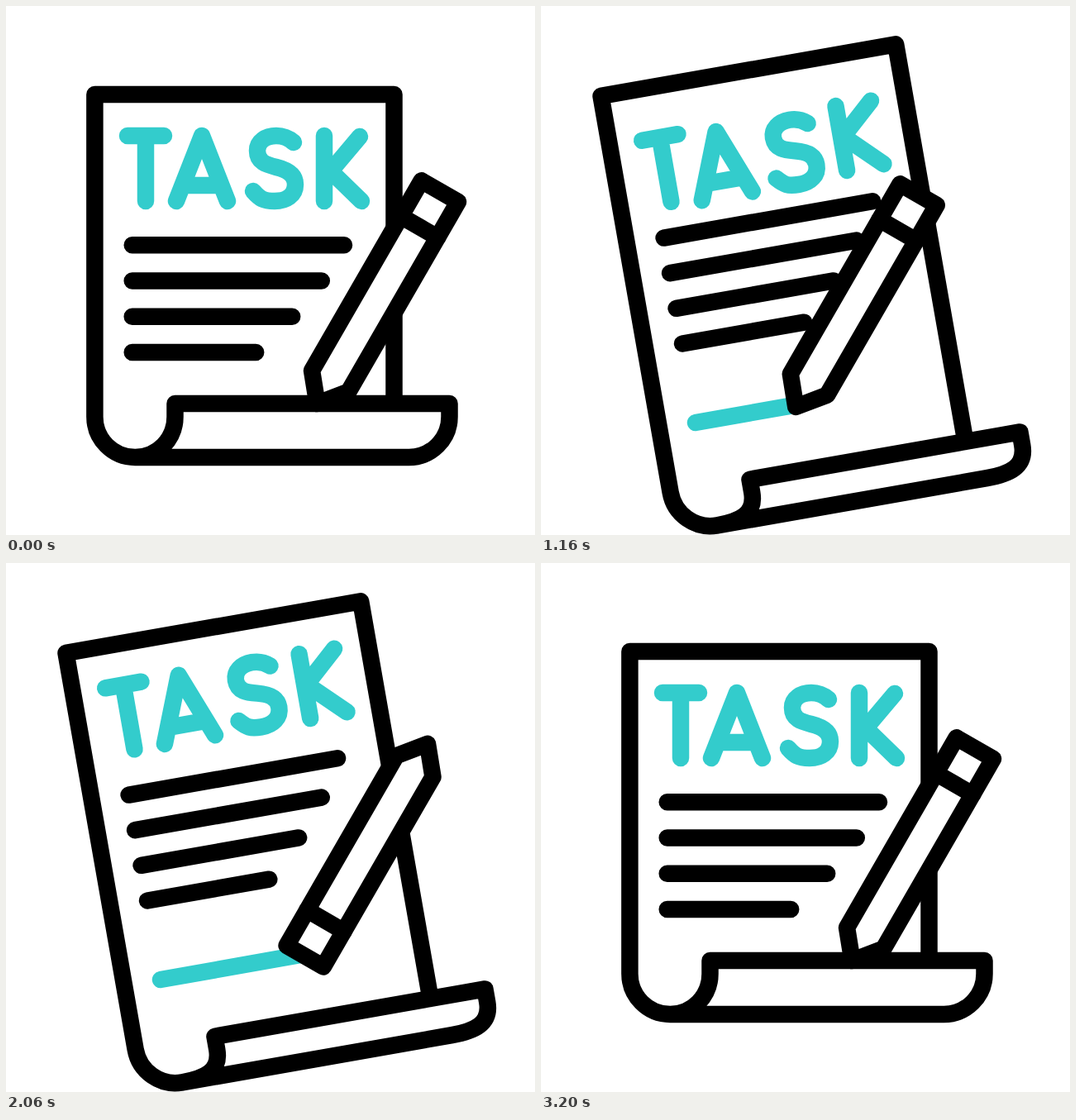
Recreate the animation shown at these times as an HTML page. Size 640 by 640 pixels, loop 3.42 s.

```html
<!DOCTYPE html>
<html lang="en">
<head>
<meta charset="utf-8">
<title>Task</title>
<style>
  html, body { margin: 0; width: 100%; height: 100%; overflow: hidden; background: #fff; }
  svg { display: block; width: 100vw; height: 100vh; }
  path { fill: none; stroke: #000; stroke-width: 20.5; stroke-linecap: round; stroke-linejoin: round; }
  .teal, .teal path { stroke: #3cc; }
</style>
</head>
<body>
<svg viewBox="0 0 640 640">
  <g id="paper">
    <path id="sheet"/>
    <path id="rules"/>
    <g class="teal" id="word" role="img" aria-label="TASK">
      <path d="M39 50h44m-22 0v79"/>
      <path d="M98 129l31-79 31 79m-54-19h46"/>
      <path d="M240 58Q231 50 219 50C206 50 196 57 196 68C196 82 207 85 219 88S242 96 242 109 231 129 217 129 199 126 191 117"/>
      <path id="k"/>
    </g>
  </g>
  <path id="line" class="teal"/>
  <g id="pencil">
    <path d="M-25.6-132.6H25.6V132.6L0 164L-25.6 132.6Z" style="fill:#fff"/>
    <path d="M-25.6-83H25.6"/>
  </g>
</svg>
<script>
const LOOP = 3420, STEP = 600;
const $ = id => document.getElementById(id);
const letters = [...$('word').children];
const place = (el, transform) => el.setAttribute('transform', transform);
const shape = (id, d) => $(id).setAttribute('d', d);

// Eased 0 to 1, beginning at the given time
function ease(t, begin, length = STEP) {
  const p = Math.min(1, Math.max(0, (t - begin) / length));
  return p * p * (3 - 2 * p);
}

// Up, down past the middle, then home
const wave = t => 18 * (2 * ease(t, 500, 460) - ease(t, 0, 500) - ease(t, 960, 500));

// Text rules, each shorter than the one above
let rules = '';
for (let i = 0; i < 4; i++) rules += `M44.7 ${182.2 + 43.3 * i}H${301 - 23 * i - 4.2 * i * i}`;
shape('rules', rules);

// The sheet grows downwards; its curl flattens a little
function sheetPath(open) {
  const left = -0.6, right = 428.5, curl = 96.5, mid = curl / 2, hook = 27;
  const top = 374 + 114 * open, bend = top + 16;
  const base = 439 + 97 * open, side = base - 49;
  return `M361.5 ${top}V0H${left}V${side}C${left} ${side + hook} ${mid - hook} ${base} ${mid} ${base}` +
    `S${curl} ${bend + hook} ${curl} ${bend}V${top}H${right}V${bend}` +
    `C${right} ${bend + hook} ${right - 22} ${base} ${right - 49} ${base}H${mid}`;
}

function draw(t) {
  const home = ease(t, 2600), open = ease(t, 0) - home;
  const write = ease(t, 800), flip = ease(t, 1400), erase = ease(t, 2000);

  place($('paper'), `translate(${108 - 34.9 * open} ${107 + 1.8 * open}) rotate(${-9.95 * open})`);
  shape('sheet', sheetPath(open));
  shape('k', `M277 50v79M320 51L277 ${102 - 12 * open}M322 129L285 93`);
  letters.forEach((el, i) => place(el, `translate(0 ${wave(t - 110 * i)})`));

  const drawn = write - erase;
  shape('line', drawn > 0 ? `M187 504l${186.5 * drawn} ${-33 * drawn}` : '');

  const x = 458.5 - 192.4 * ease(t, 0) + 190.9 * write - 23.5 * flip - 189.5 * erase + 214.5 * home;
  const y = 339 + 26.3 * ease(t, 0) - 34.3 * write + 28.8 * flip + 36.2 * erase - 57 * home;
  place($('pencil'), `translate(${x} ${y}) rotate(${30 - 180 * (flip - home)})`);
}

const start = performance.now();
function tick() {
  draw((performance.now() - start) % LOOP);
  requestAnimationFrame(tick);
}
tick();
</script>
</body>
</html>
```
